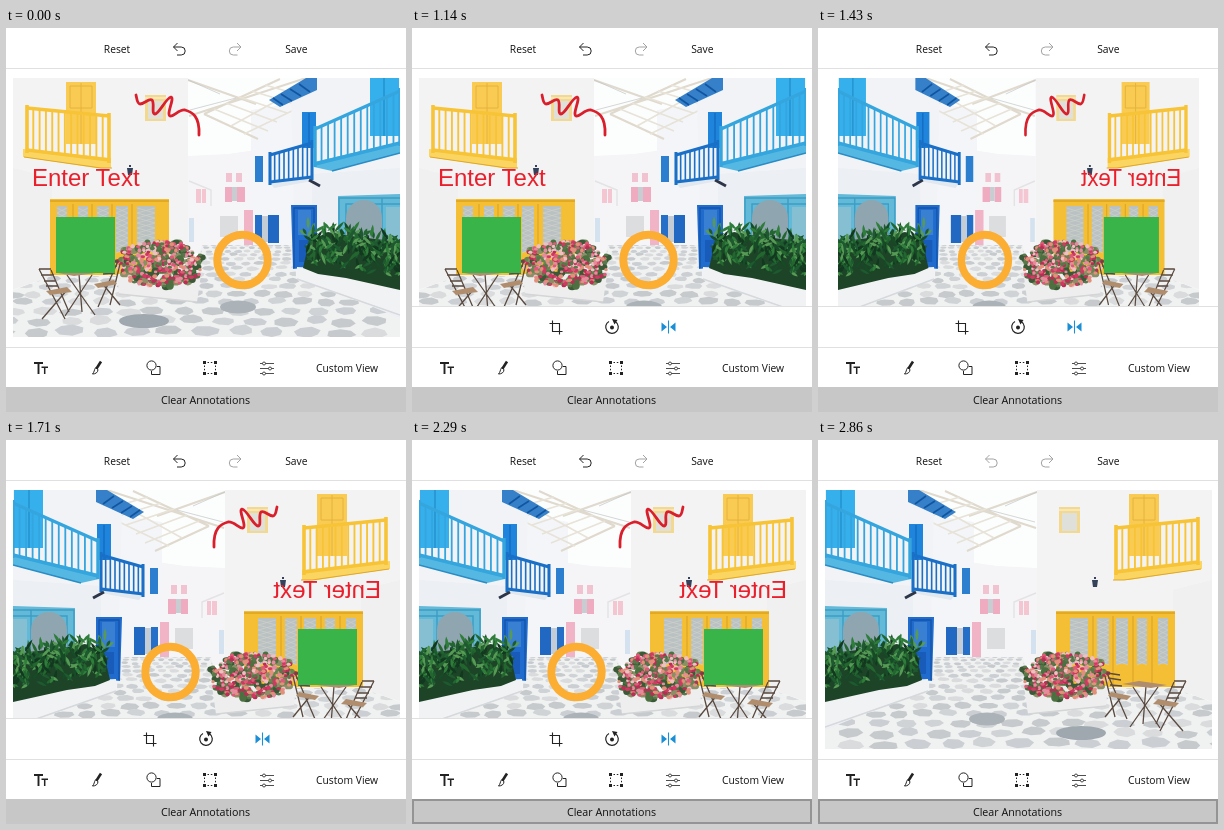
These frames come from a looping animation (400x384 px, 3010 ms). An HTML page:

```html
<!DOCTYPE html>
<html lang="en">
<head>
<meta charset="utf-8">
<title>Image editor: flip and clear</title>
<style>
html, body { margin: 0; width: 100%; height: 100%; overflow: hidden; background: #fff; }
svg { display: block; width: 100%; height: 100%; }
.ui { font: 10.3px "Open Sans", "Noto Sans", sans-serif; fill: #111; text-anchor: middle; }
.icon { fill: none; stroke: currentColor; color: #222; }
.solid { fill: currentColor; stroke: none; }
</style>
</head>
<body>
<svg viewBox="0 0 400 384">
  <defs><clipPath id="crop"><rect x="7" y="50" width="387" height="259"/></clipPath></defs>
  <rect width="400" height="384" fill="#fff"/>
  <g id="view">
    <g id="photo" clip-path="url(#crop)"></g>
    <g id="notes">
      <path d="M130 67C131 71 131 76 134 76C138 76 143 70 146 72C149 75 145 86 149 86C153 86 160 70 165 69C169 70 160 86 164 88C168 89 173 81 179 82C186 84 194 88 193 107" fill="none" stroke="#d91f2b" stroke-width="2.8" stroke-linecap="round"/>
      <text x="26" y="158" font-family="Liberation Sans, Arial, sans-serif" font-size="24" fill="#ea1f2c">Enter Text</text>
      <rect x="50" y="189" width="59" height="56" fill="#38b449"/>
      <circle cx="236.500" cy="232" r="25.200" fill="none" stroke="#fbae32" stroke-width="8"/>
    </g>
  </g>

  <g id="panel">
    <rect y="278" width="400" height="42" fill="#fff"/>
    <path d="M0 278.500H400" stroke="#e0e0e0"/>
    <path class="icon" d="M140.500 292.500V303.500H150.500M137.500 295.500H147.500V306.500" stroke-width="1.100"/>
    <g class="icon" stroke-width="1.200">
      <path d="M203.500 293.800A6.300 6.300 0 1 1 197 293.500"/>
      <circle class="solid" cx="200" cy="299.500" r="2"/>
      <path class="solid" d="M200 291L205.500 292L202.500 296.500Z"/>
    </g>
    <g class="icon" id="flip">
      <path d="M256.500 292.500V305.500" stroke-width="1.100"/>
      <path class="solid" d="M249.500 294.500L255 299L249.500 303.500ZM263.500 294.500L258 299L263.500 303.500Z"/>
    </g>
  </g>

  <path d="M0 40.500H400M0 319.500H400" stroke="#e0e0e0"/>
  <g class="ui">
    <text x="111" y="25">Reset</text>
    <text x="290.300" y="25">Save</text>
    <text x="341" y="344">Custom View</text>
  </g>
  <path class="icon" id="undo" d="M171.500 15L167.500 19L171.500 23M167.500 19H175.200A4 4 0 0 1 175.200 27H171"/>
  <path class="icon" style="color:#a3a3a3" d="M231 15L235 19L231 23M235 19H227.300A4 4 0 0 0 227.300 27H231.500"/>

  <path class="icon" d="M28 335H37M32.500 335V346" stroke-width="1.900"/>
  <path class="icon" d="M35.500 339.300H42M38.700 339.300V346" stroke-width="1.500"/>
  <path class="icon" d="M95 333.500L90.500 340.500" stroke-width="2.600"/>
  <path class="icon" d="M92 341.500L89.500 339.800C88 342 88.500 344 86.500 346C89.500 346 92 344.500 92 341.500Z"/>
  <circle class="icon" cx="145.500" cy="337.500" r="4.600"/>
  <path class="icon" d="M150.800 338.500H154V346.500H145.500V343"/>
  <g class="icon" id="select">
    <path class="solid" d="M197 333h3v3h-3zM208 333h3v3h-3zM197 344h3v3h-3zM208 344h3v3h-3z"/>
    <path d="M201.500 334.500H207M201.500 345.500H207M198.500 337.500V343M209.500 337.500V343" stroke-dasharray="1.500 1.800"/>
  </g>
  <g class="icon" stroke-width=".8">
    <path d="M254 335.500H256.500M259.500 335.500H268M254 340.500H262.500M265.500 340.500H268M254 345.500H256.500M259.500 345.500H268"/>
    <circle cx="258" cy="335.500" r="1.500"/><circle cx="264" cy="340.500" r="1.500"/><circle cx="258" cy="345.500" r="1.500"/>
  </g>

  <rect id="button" y="359" width="400" height="25"/>
  <rect id="edge" x="1" y="360" width="398" height="23" fill="none" stroke="#949494" stroke-width="2"/>
  <text class="ui" x="199.500" y="376" style="font-size:10.700px">Clear Annotations</text>
</svg>
<script>
const $ = id => document.getElementById(id);
const LOOP = 3010;
const BLUE = '#1a8fd6', INK = '#222', FAINT = '#a3a3a3';

let seed = 11;
const rnd = (a = 0, b = 1) => {
  seed = (seed * 16807) % 2147483647;
  return a + (b - a) * seed / 2147483647;
};
const pick = list => list[Math.floor(rnd() * list.length)];
const box = (x, y, w, h, fill) => `<rect x="${x}" y="${y}" width="${w}" height="${h}" fill="${fill}"/>`;
const poly = (d, fill) => `<path d="M${d}Z" fill="${fill}"/>`;
const line = (d, stroke, w = 1) => `<path d="${d}" fill="none" stroke="${stroke}" stroke-width="${w}"/>`;
const oval = (x, y, rx, ry, fill) => `<ellipse cx="${x}" cy="${y}" rx="${rx}" ry="${ry}" fill="${fill}"/>`;

// Balcony fence between two posts, given its top and bottom edge.
function fence(x1, top1, low1, x2, top2, low2, n, color, w) {
  let bars = '';
  for (let i = 0; i <= n; i++) {
    const k = i / n, x = x1 + (x2 - x1) * k;
    bars += `M${x} ${top1 + (top2 - top1) * k}L${x} ${low1 + (low2 - low1) * k}`;
  }
  return line(bars, color, w) +
    line(`M${x1} ${top1}L${x2} ${top2}M${x1} ${low1}L${x2} ${low2}`, color, w * 1.9) +
    line(`M${x1} ${top1 - 3}V${low1 + 3}M${x2} ${top2 - 3}V${low2 + 3}`, color, w * 1.9);
}

function stones() {
  let out = '';
  for (let y = 217, h = 3, row = 0; y < 316; row++) {
    const w = h * 2.7;
    for (let x = 232 - Math.ceil(240 / w) * w + (row % 2) * w / 2; x < 400; x += w) {
      const cx = x + rnd(-.1, .1) * w, cy = y + rnd(-.18, .18) * h;
      const rx = w * rnd(.36, .46), ry = h * rnd(.36, .46), n = 7, turn = rnd(0, 6);
      const pts = [];
      for (let i = 0; i < n; i++) {
        const a = turn + i * 2 * Math.PI / n, r = rnd(.86, 1.08);
        pts.push((cx + rx * r * Math.cos(a)).toFixed(1) + ' ' + (cy + ry * r * Math.sin(a)).toFixed(1));
      }
      out += poly(pts.join('L'), pick(['#d0d3d6', '#c6cacd', '#d9dbdc', '#cbcfd3']));
    }
    y += h * .98;
    h = 3 + (y - 217) * .11;
  }
  return out + oval(138, 293, 25, 7, '#9fa8af') + oval(232, 279, 18, 6.5, '#abb2b8');
}

function leaves() {
  let out = poly('297 240L303 214L322 204L345 208L394 214V262L340 250L312 246', '#1d4427');
  for (let i = 0; i < 230; i++) {
    const x = rnd(300, 396), y = rnd(204, 244) + (x - 345) * .17;
    const len = rnd(7, 15);
    out += `<path transform="translate(${x.toFixed(1)} ${y.toFixed(1)}) rotate(${rnd(-160, -20).toFixed(0)})" ` +
      `d="M0 0Q${len / 2} -3 ${len} 0Q${len / 2} 3 0 0" fill="${pick(['#174a26', '#23662f', '#2f7d3a', '#12381f', '#569a55', '#1e5930'])}"/>`;
  }
  return out;
}

function flowers() {
  let out = '';
  const spots = (n, colors, r) => {
    for (let i = 0; i < n; i++) {
      const a = rnd(0, 6.283), d = Math.sqrt(rnd());
      out += oval((154 + 44 * d * Math.cos(a)).toFixed(1), (236 + 23 * d * Math.sin(a)).toFixed(1), rnd(.6, 1) * r, rnd(.5, .9) * r, pick(colors));
    }
  };
  spots(130, ['#4c7040', '#65874f', '#3a5a37', '#8a8f66'], 5);
  spots(280, ['#cf3a62', '#dd5b78', '#e88a9e', '#b92e55', '#f0bfc2', '#e2907a', '#58774a'], 2.6);
  return out;
}

function scene() {
  const yellow = '#f8c437', gold = '#dfa828', blue = '#1a6fc6', sky = '#35a5de';
  let s = box(7, 50, 387, 259, '#fcfdfd');
  // alley
  s += poly('182 128L222 126L250 122V225H182', '#f5f5f7') + poly('245 82L288 75V222H245', '#f3f5f8');
  s += line('M182 52L250 76M198 86L252 111M183 88L300 50M198 86L274 51', '#e0dace', 2);
  s += line('M208 81L262 103M220 75L271 94M233 69L281 85M246 63L288 76M259 57L294 67M225 98L290 62M238 106L292 80', '#e8e3d8', 1.6);
  s += line('M180 51L214 66M184 82L230 70', '#c3c4c6', .7);
  s += box(220, 145, 6, 9, '#f1c3d0') + box(230, 145, 6, 9, '#f1c3d0');
  s += box(219, 159, 7, 15, '#efabc0') + box(226, 159, 5, 14, '#c8cdd2') + box(231, 159, 8, 15, '#efabc0');
  s += box(190, 161, 5, 14, '#f3c6d2') + box(196, 161, 4, 14, '#f3c6d2') + box(214, 188, 18, 21, '#dcdddf');
  s += line('M183 153L205 162V178', '#e3e3e6', 1.5) + box(238, 182, 9, 35, '#f1b3c6') + box(183, 190, 5, 24, '#d3e2ee');
  s += box(249, 128, 8, 26, '#2b7fce') + box(249, 187, 7, 28, '#256fc8') + box(256, 188, 6, 26, '#c4ccd6') + box(262, 187, 11, 28, '#2068c2');
  // ground
  const floor = '7 262L45 248L190 246L196 217H290L306 250L394 284V309H7';
  s += poly(floor, '#f0f1f1');
  s += `<clipPath id="floor"><path d="M${floor}Z"/></clipPath><g clip-path="url(#floor)">${stones()}</g>`;
  // right house
  s += poly('285 66L311 50H394V286L290 250', '#f1f3f7') + poly('306 146L394 140V290L306 254', '#eceff4');
  s += poly('263 72L274 79L311 62V50H300', '#3580c8') + line('M267 70L277 77M275 66L286 73M284 61L295 68M293 56L304 64', '#10559f', 1.6);
  s += box(296, 84, 14, 36, '#1f84dc') + line('M303 85V120', '#0f62b4');
  s += box(364, 50, 29, 58, '#35b0ec') + line('M378 50V108', '#2390cc', 1.4);
  s += poly('262 152L306 147V153L268 160', '#e1e8f0') + fence(264, 127, 154, 306, 115, 149, 9, blue, 1.6);
  s += poly('308 134L394 114V125L326 143L308 139', '#55b8e2') + fence(309, 101, 136, 394, 63, 115, 13, sky, 1.8);
  s += line('M326 143L394 125', '#2a8cc4', 1.5) + line('M303 152L314 158', '#2c3648', 3);
  s += poly('285 177L311 177V238L287 241', '#1f6bce') + line('M288 240V180H308V236', '#1453a6', 1.3) + box(292, 182, 13, 25, '#3a80d2') + box(293, 212, 11, 22, '#185bb8');
  s += poly('332 168L394 166V230H332', '#62b9d8') + line('M333 230V170H394M340 230V176H394M376 170V225', '#3d9dc4', 1.4);
  s += `<path d="M340 214V190A18 18 0 0 1 376 190V214Z" fill="#8fa6b1"/>` + box(380, 179, 14, 40, '#86bfd2');
  s += poly('291 239L310 240L394 262V288L291 251', '#f1f2f4') + line('M291 251L394 287', '#d5d8dc', 1.5) + leaves();
  // left house
  s += poly('7 50H182V248H45L7 262', '#f3f3f4') + poly('7 140L46 150V248L7 261', '#f0f0f0');
  s += box(60, 54, 30, 62, '#f9cb52') + line('M75 55V116M64 58H86V80H64Z', '#e5b23c');
  s += poly('17 121L105 130V140H90L17 129', '#fbd561') + fence(21, 80, 122, 103, 88, 132, 13, yellow, 1.9) + line('M18 129L95 140H106', gold, 1.2);
  s += box(139, 67, 21, 26, '#f3d98f') + box(142, 73, 15, 18, '#dfe0da') + line('M139 70H160', '#f8e6b4', 2);
  s += line('M124 137V139', '#34415a', 2) + poly('121 140H127L126 147H122', '#34415a');
  s += box(44, 171, 119, 76, '#f4bf34') + line('M44 173H163', '#e2aa20', 2) + line('M67 176V247M86 176V247M106 176V247M126 176V247', gold, 1.3);
  for (const [x, w] of [[51, 10], [72, 10], [91, 12], [110, 12], [131, 18]]) {
    s += box(x, 178, w, 46, '#b9c1c3');
    let net = '';
    for (let y = 180; y < 222; y += 5) net += `M${x} ${y}l${w} 5M${x} ${y + 5}l${w} -5`;
    s += line(net, '#d0d2c9', .7);
  }
  // table, chairs and planter
  const wood = '#5a4a40', tan = '#b08d6c';
  s += poly('111 246H195L191 274L113 266', '#efeeef') + line('M113 266L191 274', '#d4d5d7', 1.5) + flowers();
  s += line('M33 241L59 291M36 291L61 262M45 242L63 284M33 241H45M35 247H48M38 253H50M40 258H52', wood, 1.3) + poly('40 263L61 259L66 264L44 267', tan);
  s += line('M61 247L89 287M86 247L59 288M73 246L76 284', wood, 1.3) + poly('52 245L80 241L97 244L68 248', tan);
  s += line('M112 233L92 279M96 255L114 277M114 236L104 277M99 235L112 233M98 240L111 238M97 246L109 245', wood, 1.3) + poly('88 256L108 252L111 256L92 260', tan);
  return s;
}

$('photo').innerHTML = scene();

const show = (id, on) => $(id).setAttribute('visibility', on ? 'visible' : 'hidden');
const tint = (id, color) => { $(id).style.color = color; };
const between = (t, a, b) => t >= a && t < b;

// The turn is seen in a few held poses.
const turn = t => t < 1290 ? 1 : t < 1430 ? -.3 : t < 1570 ? -.933 : -1;

function draw(t) {
  $('view').setAttribute('transform', `translate(200.5 0) scale(${turn(t)} 1) translate(-200.5 0)`);
  show('notes', t < 2570);
  show('panel', between(t, 430, 2710));
  tint('select', between(t, 430, 1140) ? BLUE : INK);
  tint('flip', t >= 1140 ? BLUE : INK);
  tint('undo', t >= 2570 ? FAINT : INK);
  show('edge', t >= 2000);
  $('button').setAttribute('fill', between(t, 2430, 2570) ? '#a6a6a6' : '#c7c7c7');
}

const start = performance.now();
function tick() {
  draw((performance.now() - start) % LOOP);
  requestAnimationFrame(tick);
}
tick();
</script>
</body>
</html>
```
